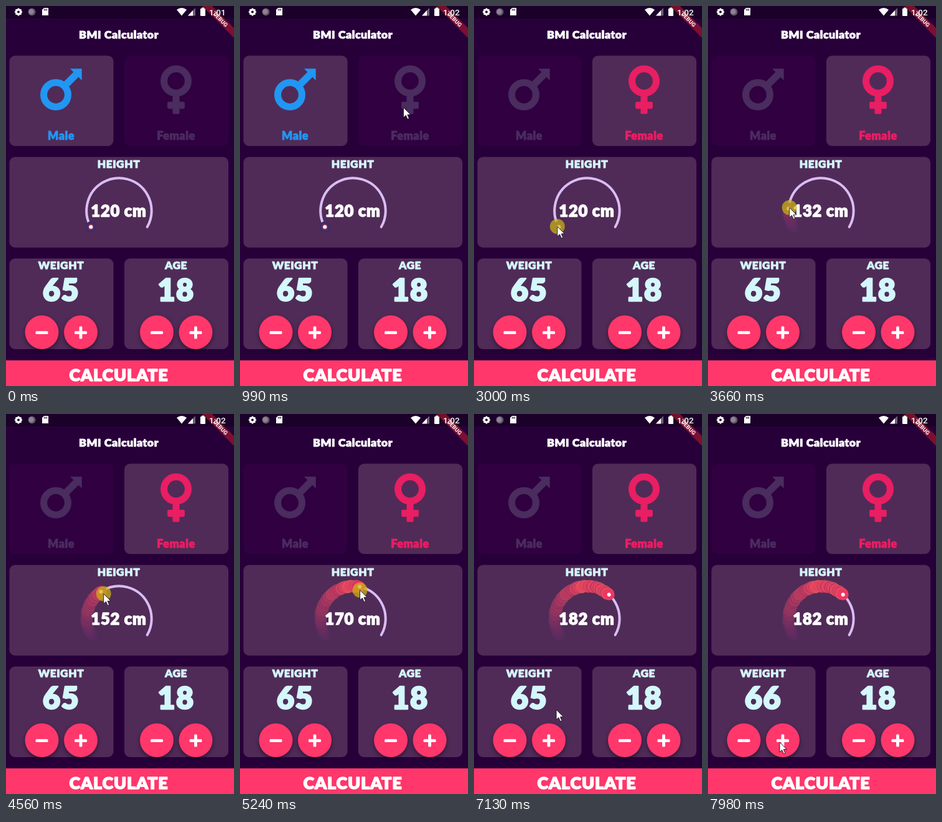
Write an HTML page with a canvas that moves like this. It is 366 by 608 pixels and loops after 8 s.

```html
<!DOCTYPE html>
<html lang="en">
<head>
<meta charset="utf-8">
<title>BMI Calculator</title>
<style>
html, body { margin: 0; width: 100%; height: 100%; overflow: hidden; background: #27003a; }
canvas { display: block; }
</style>
</head>
<body>
<canvas id="stage" width="366" height="608"></canvas>
<script>
const ctx = document.getElementById('stage').getContext('2d');
const LOOP = 8000, TAU = Math.PI * 2, RAD = Math.PI / 180;
const BACK = '#27003a', CARD = '#502b57', CARD_OFF = '#300041';
const PINK = '#ff376b', CYAN = '#d3f7fb', WHITE = '#fff';
const ICON = 25 / 144; // icon grid unit in pixels
const DIAL = { x: 181.5, y: 327.5, r: 52.2 };

const span = (t, a, b) => Math.min(1, Math.max(0, (t - a) / (b - a)));
const glide = (t, a, b) => { const u = span(t, a, b); return u * u * (3 - 2 * u); };
const mix = (a, b, p) => a.map((v, i) => v + (b[i] - v) * p);
const rgb = c => `rgb(${c.map(Math.round)})`;
const noise = n => { const v = Math.sin(n * 127.1 + 3.7) * 43758.5; return v - Math.floor(v); };

// Dial sweep in degrees, and a point on the dial at that sweep
const sweepOf = height => (height - 120) * 2.62;
const dialPoint = (sweep, r = DIAL.r) => [
  DIAL.x + r * Math.cos((150 + sweep) * RAD),
  DIAL.y + r * Math.sin((150 + sweep) * RAD)
];

function heightAt(t) {
  const u = span(t, 3000, 6220);
  return 120 + 62 * Math.min(1, u + 1.6 * u ** 4 * (1 - u));
}

// Enter, pick the gender, drag the dial, then press the weight button
function pointerAt(t) {
  const grip = dialPoint(sweepOf(heightAt(t)) + 2, 54 - 7 * span(t, 3000, 4560));
  let p = mix([110, 608], [268, 146], glide(t, 370, 1070));
  p = mix(p, grip, glide(t, 2100, 2660));
  p = mix(p, [105, 532], glide(t, 6800, 7290));
  return mix(p, [115, 525], glide(t, 7700, 7980));
}

const isPressed = t =>
  [[1500, 1700], [3000, 6660], [7540, 7700]].some(([a, b]) => t >= a && t < b);

function disc(x, y, r, color) {
  ctx.fillStyle = color;
  ctx.beginPath();
  ctx.arc(x, y, r, 0, TAU);
  ctx.fill();
}

function ring(x, y, r, width, color, from = 0, to = TAU) {
  ctx.strokeStyle = color;
  ctx.lineWidth = width;
  ctx.beginPath();
  ctx.arc(x, y, r, from, to);
  ctx.stroke();
}

function poly(color, ...p) {
  ctx.fillStyle = color;
  ctx.beginPath();
  for (let i = 0; i < p.length; i += 2) ctx.lineTo(p[i], p[i + 1]);
  ctx.closePath();
  ctx.fill();
}

function box(x, y, w, h, r, color) {
  ctx.fillStyle = color;
  ctx.beginPath();
  ctx.roundRect(x, y, w, h, r);
  ctx.fill();
}

// Heavy lettering with softened corners
function label(str, x, y, size, color) {
  ctx.font = `900 ${size}px Lato, sans-serif`;
  ctx.letterSpacing = size * .03 + 'px';
  ctx.textAlign = 'center';
  ctx.fillStyle = ctx.strokeStyle = color;
  ctx.lineJoin = 'round';
  ctx.lineWidth = size * .05;
  ctx.fillText(str, x, y);
  ctx.strokeText(str, x, y);
  ctx.letterSpacing = '0px';
}

function banner() {
  ctx.save();
  ctx.translate(366, 0);
  ctx.rotate(45 * RAD);
  box(-45, 25, 90, 11, 0, 'rgba(172,24,44,.65)');
  ctx.font = '900 9px Roboto, sans-serif';
  ctx.textAlign = 'center';
  ctx.fillStyle = '#f0e6ec';
  ctx.fillText('DEBUG', 0, 33.7);
  ctx.restore();
}

function statusBar(t) {
  const dark = '#1b0029';
  box(0, 0, 366, 20, 0, dark);
  for (let a = 0; a < TAU; a += TAU / 8)
    disc(20 + 4.7 * Math.cos(a), 9.5 + 4.7 * Math.sin(a), 1.5, WHITE);
  ring(20, 9.5, 3.5, 3, WHITE);
  disc(41.5, 9.5, 6, '#5f5368');
  disc(40.5, 9, 4.2, '#8d8592');
  poly(WHITE, 61, 3, 68, 3, 68, 15, 58, 15, 58, 6);
  for (let x = 61; x < 67; x += 2) box(x, 4.5, 1, 3, 0, dark);
  ctx.fillStyle = WHITE;
  ctx.beginPath();
  ctx.moveTo(282, 15.5);
  ctx.lineTo(274, 6);
  ctx.quadraticCurveTo(282, 0, 290, 6);
  ctx.fill();
  poly('#6f6178', 304, 3, 304, 15.5, 292, 15.5);
  poly(WHITE, 300, 7, 300, 15.5, 292, 15.5);
  box(312, 4, 8, 12, 1, WHITE);
  box(314, 2.5, 4, 2, 0, WHITE);
  banner();
  ctx.font = '500 13.5px Roboto, sans-serif';
  ctx.textAlign = 'left';
  ctx.fillStyle = WHITE;
  ctx.fillText(t < 700 ? '1:01' : '1:02', 326, 14.5);
}

// Icons are drawn in grid units around the centre of their ring
function inIcon(x, y, color, drawRest) {
  ctx.save();
  ctx.translate(x, y);
  ctx.scale(ICON, ICON);
  ring(0, 0, 112, 64, color);
  drawRest();
  ctx.restore();
}

function genderCard(x, name, active, color, drawRest, iconX, iconY) {
  box(x, 79.5, 167, 144.5, 9, active ? CARD : CARD_OFF);
  inIcon(iconX, iconY, color, () => drawRest(color));
  label(name, x + 83, 214, 18, color);
}

function maleArrow(color) {
  ctx.lineWidth = 65;
  ctx.beginPath();
  ctx.moveTo(85, -85);
  ctx.lineTo(190, -190);
  ctx.stroke();
  poly(color, 132, -240, 240, -240, 240, -132);
}

function femaleCross(color) {
  box(-32, 130, 64, 174, 12, color);
  box(-80, 192, 160, 64, 12, color);
}

function dial(height) {
  const sweep = sweepOf(height);
  const tint = s => mix([74, 42, 92], [236, 56, 98], span(s, -15, 115));
  box(5.5, 241.5, 351.5, 145, 9, CARD);
  label('HEIGHT', 181, 259, 17.4, CYAN);
  ctx.lineCap = 'round';
  ring(DIAL.x, DIAL.y, DIAL.r, 4, '#d9bdf3', 150 * RAD, 390 * RAD);
  ctx.lineCap = 'butt';
  // Overlapping knobs with uneven edges build the ribbed progress arc
  for (let s = 0, i = 0; s < sweep; s += 2.2, i++) {
    const [x, y] = dialPoint(s, DIAL.r - 1 + noise(i) * 1.4);
    const warm = noise(i + 40) * span(s, 20, 110);
    const edge = mix([66, 44, 104], [236, 146, 78], warm);
    disc(x, y, 9.5, rgb(tint(s)));
    ring(x, y, 9.2, .8, rgb(mix(tint(s), edge, .55)));
  }
  const [x, y] = dialPoint(sweep);
  disc(x, y, 9, rgb(mix([64, 42, 104], tint(sweep), span(sweep, 0, 60))));
  disc(x, y, 5, rgb(mix([133, 44, 85], tint(sweep), span(sweep, 0, 60))));
  disc(x, y, 3, WHITE);
  label(Math.floor(height) + ' cm', 181, 336.5, 25.6, WHITE);
}

function roundButton(x, plus, lift) {
  ctx.save();
  ctx.shadowColor = 'rgba(10,0,25,.5)';
  ctx.shadowBlur = 6 + lift * 5;
  ctx.shadowOffsetY = 3 + lift * 3;
  disc(x, 522, 27, PINK);
  ctx.restore();
  box(x - 10, 520.2, 20, 4.8, 1.5, WHITE);
  if (plus) box(x - 2.4, 512.6, 4.8, 20, 1.5, WHITE);
}

function counter(x, name, value, lift) {
  box(x, 404, 167, 145, 9, CARD);
  label(name, x + 83, 421, 17.4, CYAN);
  label(value, x + 83, 472, 48.5, CYAN);
  roundButton(x + 52, false, 0);
  roundButton(x + 114.5, true, lift);
}

function cursor(x, y) {
  ctx.save();
  ctx.translate(x, y);
  poly(WHITE, 0, 0, 0, 16, 3.8, 12.6, 6.6, 18.8, 9, 17.7, 6.4, 11.7, 11.3, 11.5);
  ctx.strokeStyle = '#1a1020';
  ctx.lineWidth = .9;
  ctx.stroke();
  ctx.restore();
}

function draw(t) {
  const male = t < 1650;
  const lift = 1 - span(Math.abs(t - 7780), 0, 200);
  const [x, y] = pointerAt(t);
  box(0, 0, 366, 608, 0, BACK);
  label('BMI Calculator', 181, 51.5, 17.8, WHITE);
  genderCard(5.5, 'Male', male, male ? '#2196f3' : '#4a2c5f', maleArrow, 80, 142);
  genderCard(190, 'Female', !male, male ? '#4a2c5f' : '#e91e63', femaleCross, 273, 120);
  dial(heightAt(t));
  counter(5.5, 'WEIGHT', t < 7700 ? 65 : 66, lift);
  counter(190, 'AGE', 18, 0);
  box(0, 567, 366, 41, 0, PINK);
  label('CALCULATE', 181, 599.5, 27, WHITE);
  statusBar(t);
  if (isPressed(t)) disc(x, y, 12, 'rgba(204,182,18,.72)');
  if (t > 370) cursor(x, y);
}

function frame() {
  draw(performance.now() % LOOP);
  requestAnimationFrame(frame);
}
frame();
</script>
</body>
</html>
```
